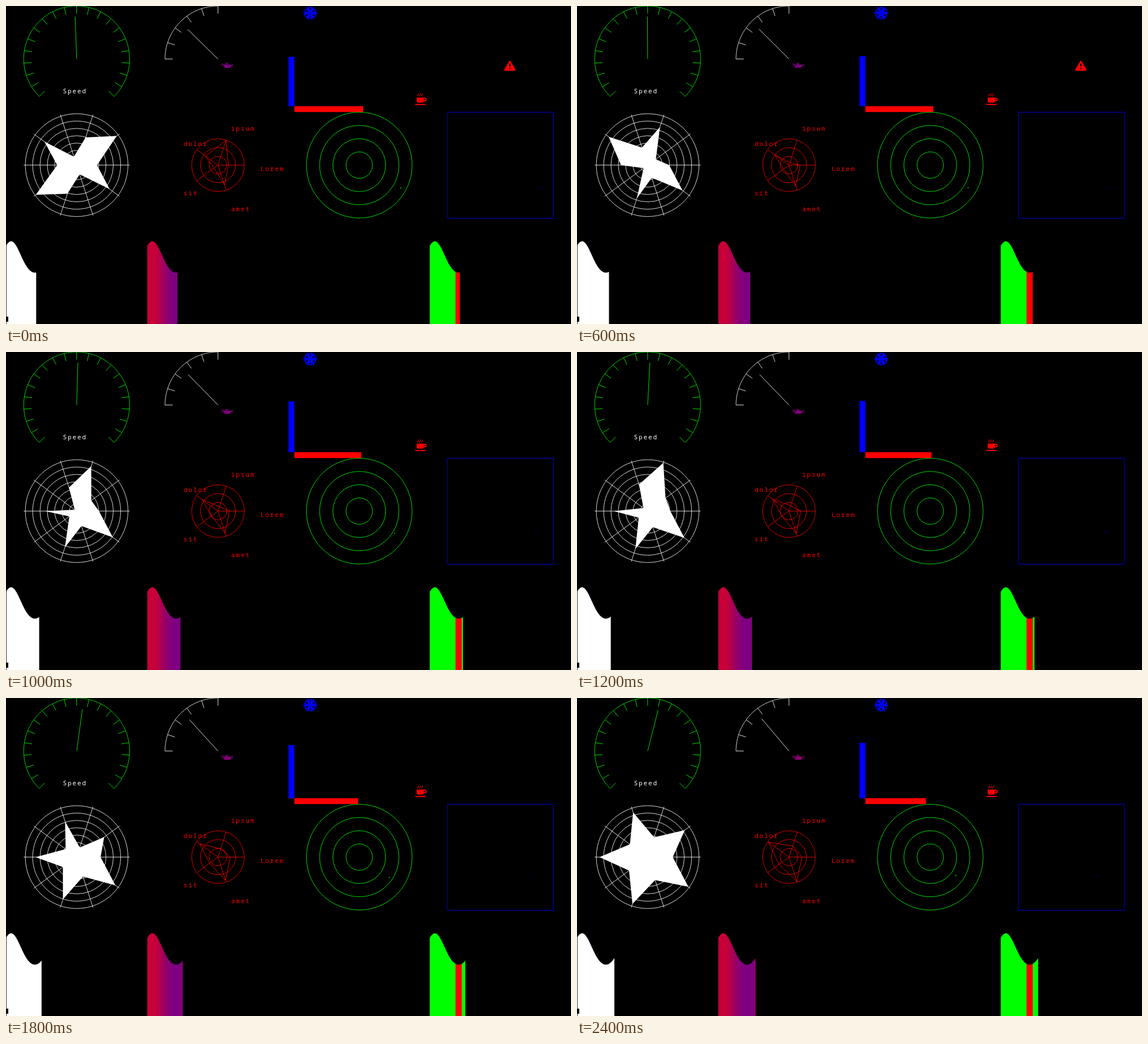
An HTML page for the animation above (2.5 s loop, 998 px wide and 561 px high).

```html
<!DOCTYPE html>
<html lang="en">
<head>
<meta charset="utf-8">
<title>Instrument panel</title>
<style>
  html, body { margin: 0; width: 100%; height: 100%; overflow: hidden; background: #000; }
  svg { display: block; width: 998px; height: 561px; }
  text { font: 11px "Noto Sans Mono", "DejaVu Sans Mono", monospace; letter-spacing: 1.9px; }
  .line { fill: none; stroke-width: .85; }
</style>
</head>
<body>
<svg id="stage" viewBox="0 0 998 561" xmlns="http://www.w3.org/2000/svg"></svg>
<script>
const stage = document.getElementById('stage');
const CELL = 249.5, R = 93.5, MID = 280.7;
const FRAMES = 25, STEP = 100;
const GREEN = '#0f0', RED = '#f00', BLUE = '#00f', WHITE = '#fff';

function add(tag, attrs, parent = stage) {
  const el = document.createElementNS('http://www.w3.org/2000/svg', tag);
  set(el, attrs);
  parent.appendChild(el);
  return el;
}
function set(el, attrs) {
  for (const key in attrs) el.setAttribute(key, attrs[key]);
}
function polar(cx, cy, r, degrees) {
  const a = degrees * Math.PI / 180;
  return [cx + r * Math.cos(a), cy - r * Math.sin(a)];
}
const pathOf = points => 'M' + points.map(p => p[0].toFixed(2) + ' ' + p[1].toFixed(2)).join('L');
const line = (d, stroke) => add('path', { d, stroke, class: 'line' });
const ring = (cx, cy, r, stroke) => add('circle', { cx, cy, r, stroke, class: 'line' });
const label = (x, y, fill, text) => add('text', { x, y, fill }).textContent = text;
const rect = (x, y, width, height, fill) => add('rect', { x, y, width, height, fill });

// The signal along the strip chart, 0 to 1
function signal(x) {
  const a = 2 * Math.PI * (x - 9) / 84;
  return .6255 + .148 * Math.cos(a) + .0135 * Math.cos(2 * a);
}
const blend = v => `rgb(${Math.round(255 * v)},0,${Math.round(255 * (1 - v))})`;

// Dials
function dial(cx, from, to, ticks, color) {
  const arc = [];
  for (let a = from; a >= to; a--) arc.push(polar(cx, R, R, a));
  let d = pathOf(arc);
  for (let i = 0; i <= ticks; i++) {
    const a = from + (to - from) * i / ticks;
    d += pathOf([polar(cx, R, R, a), polar(cx, R, R * .855, a)]);
  }
  line(d, color);
  const needle = line('', color);
  return v => set(needle, { d: pathOf([[cx, R], polar(cx, R, R * .8, from + (to - from) * v)]) });
}
const speedDial = dial(124.8, 225, -45, 20, GREEN);
const oilDial = dial(374.4, 180, 90, 5, WHITE);
label(100.4, 153.5, WHITE, 'Speed');

// Round grids with a shape whose corners wrap outwards
function spider(cx, r, rings, spokes, spokeLength, color, shapeStyle) {
  for (let i = 1; i <= rings; i++) ring(cx, MID, r * i / rings, color);
  const angle = i => 360 * i / spokes;
  let d = '';
  for (let i = 0; i < spokes; i++) d += pathOf([[cx, MID], polar(cx, MID, spokeLength, angle(i))]);
  line(d, color);
  const shape = add('path', shapeStyle);
  return q => {
    const corners = [];
    for (let i = 1; i <= spokes; i++) {
      corners.push(polar(cx, MID, r * (q * (spokes + 1 - i) % 1), angle(i)));
    }
    set(shape, { d: pathOf(corners) + 'Z' });
  };
}
const star = spider(124.8, 90.7, 7, 10, R, WHITE, { fill: WHITE });
const web = spider(374.5, 46.5, 3, 5, 46.5, RED, { class: 'line', stroke: RED });
label(449.6, 290.7, RED, 'Lorem');
label(397.7, 219.7, RED, 'ipsum');
label(313.8, 246.5, RED, 'dolor');
label(313.8, 334, RED, 'sit');
label(397.7, 361.7, RED, 'amet');

// Bars
const blueBar = rect(499, 0, 10.4, 0, BLUE);

// Scopes
for (let i = 1; i <= 4; i++) ring(624, MID, 93.3 * i / 4, GREEN);
add('rect', { x: 779.9, y: 187.3, width: 187.1, height: 187.1, stroke: BLUE, class: 'line' });
const redBar = rect(509.4, 176.7, 0, 10.4, RED);
const greenDot = rect(0, 0, 1.6, 1.6, GREEN);
const blueDot = rect(0, 0, 1.6, 1.3, BLUE);

// Strip charts
function strip(x, colorOf) {
  const group = add('g', { transform: `translate(${x} 0)` });
  const id = 'strip' + Math.round(x);
  const width = 70, stops = 280;
  const gradient = add('linearGradient',
    { id, gradientUnits: 'userSpaceOnUse', x1: 0, y1: 0, x2: width, y2: 0 }, group);
  for (let i = 0; i <= stops; i++) {
    const offset = i / stops;
    add('stop', { offset, 'stop-color': colorOf(signal(offset * width)) }, gradient);
  }
  return add('path', { fill: `url(#${id})` }, group);
}
const strips = [
  strip(0, () => WHITE),
  strip(CELL, blend),
  strip(CELL * 3, v => v < .5 ? RED : GREEN)
];
rect(0, 415, .8, 146, '#000');
rect(0, 548, 4, 9, '#000');

// Icons
function icon(x, y) {
  return add('g', { transform: `translate(${x} ${y})` });
}
const snow = icon(537.5, 12.5);
for (let a = 0; a < 360; a += 60) {
  add('path', {
    d: 'M2.5 0H11.2M9.6-3.8L6.4 0L9.6 3.8M5.2 0L2.6-4.5',
    transform: `rotate(${a})`, fill: 'none', stroke: BLUE, 'stroke-width': 2.3, 'stroke-linecap': 'round'
  }, snow);
}
add('circle', { r: 2, fill: BLUE }, snow);

const warning = icon(890, 105.5);
add('path', { d: 'M0-7L8.3 7H-8.3Z', fill: RED, stroke: RED, 'stroke-width': 3.4, 'stroke-linejoin': 'round' }, warning);
add('path', { d: 'M-1.2-4H1.2L.8 2.2H-.8ZM-1.1 3.7H1.1V5.9H-1.1Z', fill: '#000' }, warning);

const cup = icon(732, 164);
add('path', { d: 'M-6.5-2.5H6V3.5Q6 6.5 3 6.5H-3.5Q-6.5 6.5-6.5 3.5ZM-10.5 8.7H10.5Q9 10.8 7 10.8H-7Q-9 10.8-10.5 8.7Z', fill: RED }, cup);
add('path', { d: 'M6-1.3H7.5Q10.2-1 10.2 1T7.5 3.4H6', fill: 'none', stroke: RED, 'stroke-width': 1.8 }, cup);
for (const x of [-4, -.5, 3]) {
  add('path', { d: `M${x - .6}-4.5q-.6-1.6 .5-2.5t.6-2.6`, fill: 'none', stroke: RED, 'stroke-width': 1.1 }, cup);
}

const oil = icon(391, 104.8);
add('path', { d: 'M-5.5-1.6H3L4.5-.3L10.3-2.5L10.6-1.7L4 4.2H-5.5ZM-4.5-4.4H2V-3.2H-.4V-1.6H-2.2V-3.2H-4.5ZM9.6 .3Q11 2.6 9.6 2.8T9.6 .3Z' }, oil);
add('path', { d: 'M-5-1L-9.3-2.6L-9-.2L-5 2', fill: 'none', 'stroke-width': 1.2 }, oil);

function draw(n) {
  const edge = 53.3 + .53 * n;
  const v = signal(edge);
  const q = .3965 + .003878 * n;

  speedDial(v);
  oilDial(v);
  set(oil, { fill: blend(v), stroke: 'none' });
  set(oil.lastChild, { stroke: blend(v) });
  star(q);
  web(q);

  const height = 176.7 * v;
  set(blueBar, { y: 176.7 - height, height });
  set(redBar, { width: 239.2 * (1 - v) });
  set(warning, { visibility: v < .5 ? 'visible' : 'hidden' });

  const x = 696.2 - .967 * n - .0083 * n * n;
  const y = 320.3 - .0139 * n * n;
  set(greenDot, { x, y });
  set(blueDot, { x: x + CELL - .2, y });

  const curve = [];
  for (let i = 0; i < edge; i++) curve.push([i, 562.2 - 187 * signal(i)]);
  curve.push([edge, 562.2 - 187 * v]);
  const d = pathOf([[0, 561], ...curve, [edge, 561]]) + 'Z';
  strips.forEach(s => set(s, { d }));
}

const start = performance.now();
function tick() {
  draw(Math.floor((performance.now() - start) / STEP) % FRAMES);
  requestAnimationFrame(tick);
}
tick();
</script>
</body>
</html>
```
